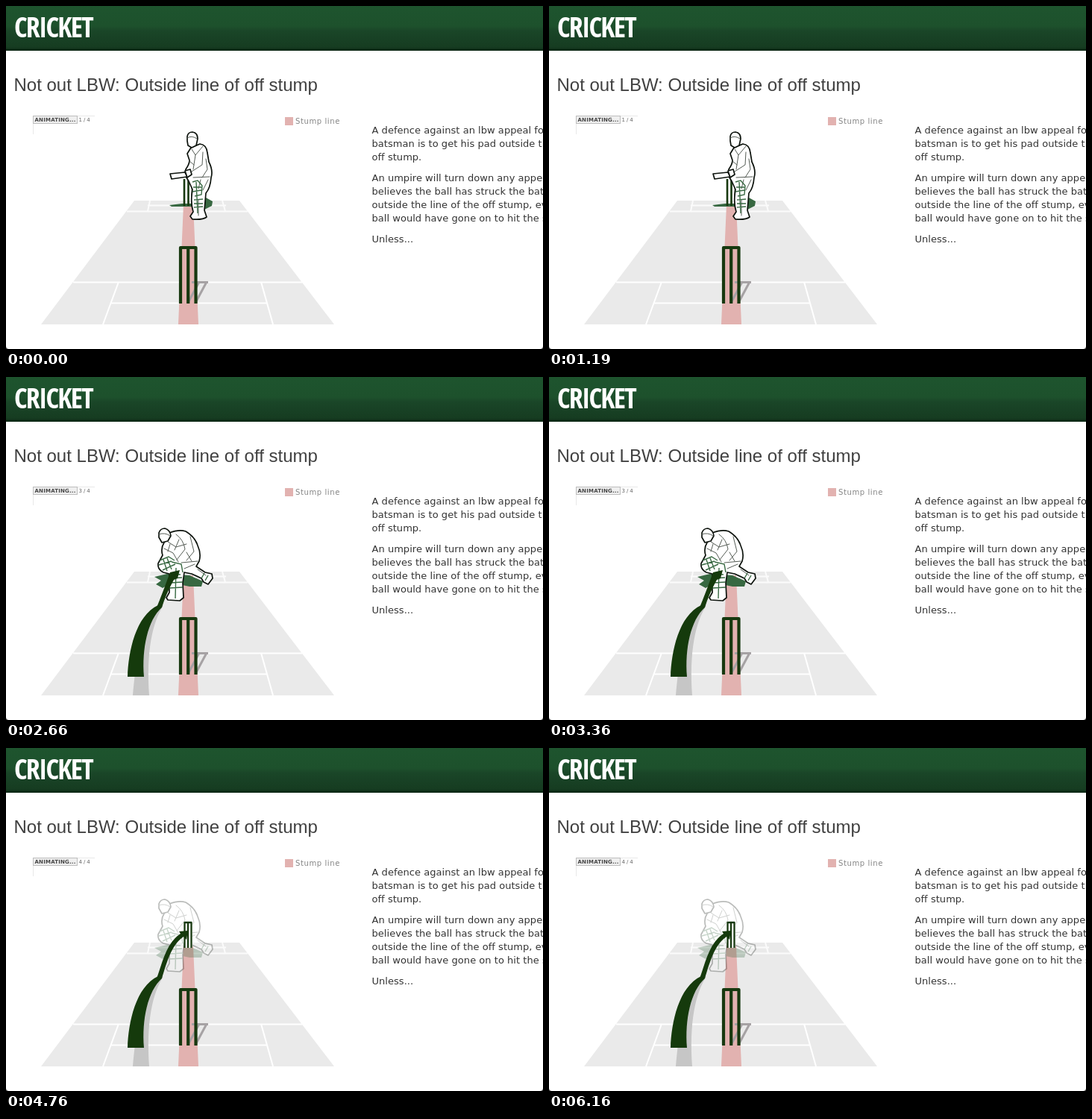
Animation of 720x460 px, one loop 6.23 s. Source, as an HTML page:

```html
<!DOCTYPE html>
<html lang="en">
<meta charset="utf-8">
<title>Not out LBW</title>
<style>
  html, body { margin: 0; width: 100%; height: 100%; overflow: hidden; background: #fff; }
  svg { display: block; width: 720px; height: 460px; }
  .masthead { font: 700 38px "Open Sans Condensed", "Roboto Condensed", "Open Sans", sans-serif;
    font-stretch: 75%; letter-spacing: -1.8px; fill: #fff; }
  .title { font: 24px "Liberation Sans", Arial, sans-serif; fill: #404040; }
  .copy { font: 13px "DejaVu Sans", Verdana, sans-serif; letter-spacing: .04px; fill: #333; }
  .status { font: 700 7px "DejaVu Sans", sans-serif; letter-spacing: .2px; fill: #444; }
  .count { font-weight: 400; letter-spacing: 2px; fill: #666; }
  .legend { font: 10px "DejaVu Sans", sans-serif; letter-spacing: .6px; fill: #858585; }
  .line { fill: none; stroke: #fff; stroke-width: 2; }
  .ink { fill: #fff; stroke: #0d130d; stroke-width: 1.7; stroke-linejoin: round; stroke-linecap: round; }
  .detail { fill: none; stroke: #555c55; stroke-width: 1; stroke-linecap: round; }
  .pad { fill: none; stroke: #376841; stroke-width: 1.4; }
  .wood { fill: none; stroke: #17380f; stroke-linejoin: round; }
  .shade { fill: #376841; }
  .ball { fill: #153a0c; }
</style>
<svg viewBox="0 0 720 460">
  <defs>
    <linearGradient id="bar" x2="0" y2="1">
      <stop offset="0" stop-color="#1e542e"/>
      <stop offset=".45" stop-color="#1d512c"/>
      <stop offset=".55" stop-color="#1a4628"/>
      <stop offset=".92" stop-color="#163c21"/>
      <stop offset="1" stop-color="#0a2412"/>
    </linearGradient>
  </defs>
  <rect width="720" height="60" fill="url(#bar)"/>
  <text class="masthead" x="11" y="42">CRICKET</text>
  <text class="title" x="10.5" y="114">Not out LBW: Outside line of off stump</text>
  <g id="copy" class="copy"></g>

  <path d="M36.5 172V147.500H119" fill="none" stroke="#e8e8e8"/>
  <rect x="36.500" y="147.500" width="59" height="10" fill="#efefef" stroke="#bdbdbd"/>
  <text class="status" x="38.500" y="155">ANIMATING...</text>
  <text id="count" class="status count" x="97.500" y="155">1/4</text>
  <rect x="374" y="149" width="11" height="11" fill="#e2b2b0"/>
  <text class="legend" x="388" y="158">Stump line</text>

  <!-- pitch -->
  <path d="M172 261H313L440 427H47Z" fill="#eaeaea"/>
  <path class="line" d="M90 370.500H397M141 398.500H350M151 370L130 427M342 370L358 427"/>
  <path class="line" stroke-opacity=".8" d="M162 275.500H324M190 267.500H295M193 261L190 275M290 261L294 275"/>
  <path d="M238 266H251L258 427H231Z" fill="#e2b2b0"/>
  <path d="M244 398L259 370M254 398L269 370M249 370.500H271" fill="none" stroke="#a6a2a4" stroke-width="3"/>
  <path data-steps="234" d="M170 427C174 385 180 330 205 310L211 306C196 330 188 368 192 427Z" fill="#c6c6c6"/>

  <!-- batsman on guard -->
  <g data-steps="12">
    <path class="shade" d="M219 267L236 265H258L268 257L277 262L276 268L266 273L250 269H222Z"/>
    <path class="wood" stroke-width="2.600" d="M239 232V268M244.500 232V268M250 232V268"/>
    <path class="ink" d="M248 190L260 185Q269 186 270 197L272 209Q278 221 275 230Q274 244 268 251L266 274L269 283Q264 287 250 286L247 282L251 276Q247 264 250 246L245 235L240 227L241 219Q246 212 246 207L243 198Z"/>
    <path class="ink" d="M243 181V175Q244 169 250 169Q257 170 257 178L255 187L249 190L244 187Z"/>
    <path class="detail" d="M243 177Q249 173 256 178M249 192L254 200L264 188M254 200L251 219M264 196L263 213L249 222M268 205L270 219L263 230M246 208L252 213M251 230L273 229M261 233L258 245M271 233L264 247M258 260V281"/>
    <path class="pad" d="M250 236L257 234L263 241L262 253L253 255M251 243H262M250 249L262 247M252 260L264 259M252 265H264M252 270L264 269M255 236L257 278"/>
    <path class="ink" d="M220 225L240 223L243 229L222 232Z"/>
    <path class="ink" d="M240 221L247 219L249 226L243 230Z"/>
  </g>

  <!-- batsman stretching forward, hit on the pad -->
  <g id="lunge" data-steps="34">
    <path class="shade" d="M199 268L216 264L246 266L264 274L262 281L246 281L222 276L210 283L201 278L208 273Z"/>
    <path class="ink" d="M219 209Q232 204 241 207Q253 214 257 226Q262 237 259 247L255 254L267 262L276 264L277 270L271 278L265 275L262 270L249 264L239 262L237 276L238 296L233 300L217 299L215 296L219 289L219 264L211 262Q203 258 204 250L210 239Q207 230 212 222Z"/>
    <path class="ink" d="M205 215V209Q207 203 213 203Q220 205 221 213L217 220L209 222Z"/>
    <path class="detail" d="M205 211Q213 208 220 213M217 221L228 228L242 224M228 211Q238 218 240 231L229 245M247 214L252 234L242 246M212 230L224 236L231 248M220 224L217 234M232 218L226 232M235 249L257 247M239 257L253 251M242 235L249 247M257 258L268 266"/>
    <path class="pad" d="M206 246L218 241L226 246M205 252L222 247M210 259L227 251M216 243L222 258M211 245L216 260M222 248L235 251L237 262M220 270L236 269M219 276L237 275M219 283L237 282M228 256L227 297M222 264L234 265M266 263L262 270M271 266L267 273"/>
  </g>
  <g data-steps="4">
    <path d="M239 234H250V268H239Z" fill="#fff"/>
    <path class="wood" stroke-width="2.300" d="M239.500 268V234H248.500V268M244 234V268"/>
  </g>

  <!-- flight of the ball -->
  <path class="ball" data-steps="234" d="M163 402C164 368 174 320 204 306L209 309C190 326 182 364 185 402Z"/>
  <path class="ball" data-steps="2" d="M197 306L215 299L210 312L206 308Z"/>
  <path class="ball" data-steps="3" d="M202 309Q209 292 217 270L220 262L233 259L230 270L225 272Q214 292 209 309Z"/>
  <path class="ball" data-steps="4" d="M202 309C210 287 215 261 234 249L232 246L244 245L242 257L238 253C222 264 216 286 209 309Z"/>

  <path class="wood" stroke-width="4.200" d="M234 399V324H254.500V399M244.200 324V399"/>
  <path d="M0 456Q0 460 4 460H0ZM720 456Q720 460 716 460H720Z" fill="#333"/>
</svg>
<script>
  const LOOP = 6230;
  const STEP_STARTS = [0, 1400, 2520, 3640];
  const paragraphs = [
    ['A defence against an lbw appeal for a', 'batsman is to get his pad outside the', 'off stump.'],
    ['An umpire will turn down any appeal if he', 'believes the ball has struck the batsman',
     'outside the line of the off stump, even if the', 'ball would have gone on to hit the stumps.'],
    ['Unless...']
  ];

  const copy = document.getElementById('copy');
  let baseline = 171;
  for (const lines of paragraphs) {
    for (const line of lines) {
      const text = document.createElementNS('http://www.w3.org/2000/svg', 'text');
      text.setAttribute('x', 490.5);
      text.setAttribute('y', baseline);
      text.textContent = line;
      copy.append(text);
      baseline += 18;
    }
    baseline += 10;
  }

  const count = document.getElementById('count');
  const lunge = document.getElementById('lunge');
  const parts = document.querySelectorAll('[data-steps]');
  let shown = 0;

  function show(step) {
    shown = step;
    count.textContent = step + '/4';
    for (const part of parts) part.style.display = part.dataset.steps.includes(step) ? '' : 'none';
    lunge.style.opacity = step === 4 ? 0.28 : 1;
  }

  const start = performance.now();
  function tick() {
    const time = (performance.now() - start) % LOOP;
    const step = STEP_STARTS.filter(t => t <= time).length;
    if (step !== shown) show(step);
    requestAnimationFrame(tick);
  }
  tick();
</script>
</html>
```
